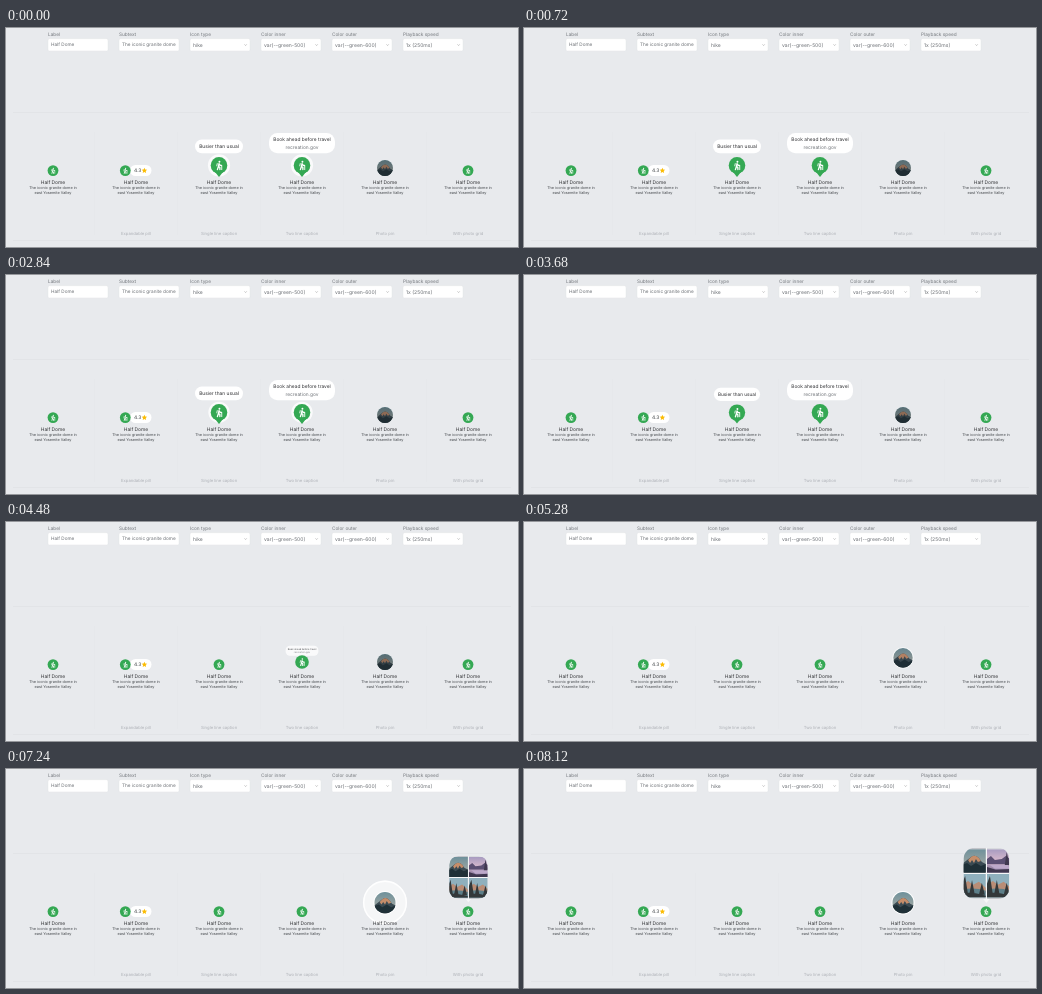
An HTML page that plays this animation: 512 px wide and 219 px high, repeating every 8.28 s.

```html
<!DOCTYPE html>
<html lang="en">
<head>
<meta charset="utf-8">
<title>Map pin states</title>
<style>
html, body { margin: 0; width: 100%; height: 100%; overflow: hidden; background: #e8eaed; }
svg { display: block; width: 100%; height: 100%; font-family: Inter, Roboto, sans-serif; text-rendering: geometricPrecision; }
</style>
</head>
<body>
<svg id="stage" viewBox="0 0 512 219">
  <defs>
    <clipPath id="round"><circle r="12"/></clipPath>
    <clipPath id="tile"><rect x="-12" y="-12" width="24" height="24"/></clipPath>
    <clipPath id="card"><rect id="cardShape" x="-23" y="-52" width="46" height="52"/></clipPath>
    <linearGradient id="haze" x2="0" y2="1">
      <stop stop-color="#6f919b"/><stop offset="1" stop-color="#b3b0a6"/>
    </linearGradient>
    <linearGradient id="dusk" x2="0" y2="1">
      <stop stop-color="#a79bc0"/><stop offset=".45" stop-color="#d3b6cb"/><stop offset="1" stop-color="#75698f"/>
    </linearGradient>
    <g id="dome">
      <path fill="url(#haze)" d="M-12-12h24v24h-24z"/>
      <path fill="#3b4b53" d="M-12 3L-7-1-3-4Q1-7 5-3L8 1 12 3V12H-12z"/>
      <path fill="#c58d6a" d="M-6-1L-3-4Q1-7 5-3L7 0 4 1 2-2 0 2-2-1-4 2z"/>
      <path fill="#1f3037" d="M-12 4L-7 2-3 5 2 2 7 5 12 3V12H-12z"/>
    </g>
    <g id="lake">
      <path fill="url(#dusk)" d="M-12-12h24v24h-24z"/>
      <path fill="#5b4f72" d="M-12-2L-8-5-4-1 3-2 7-5 12-2V3H-12z"/>
      <path fill="#bda9ca" d="M-9 4H9L12 8H-4z"/>
      <path fill="#40384f" d="M-12 6L-3 9 12 8V12H-12zM8-9L11 4H6z"/>
    </g>
    <g id="forest">
      <path fill="#8fb0bd" d="M-12-12h24v24h-24z"/>
      <path fill="#b98d76" d="M-12-1L-6-5-1-1 5-4 12 2V7H-12z"/>
      <path fill="#5d7f89" d="M-12 4Q0 1 12 5V12H-12z"/>
      <path fill="#33383a" d="M-9-10L-6 9H-12V-2zM-2-6L1 10H-5zM8-3L11 9H5zM-12 7Q-2 6 12 10V12H-12z"/>
    </g>
    <g id="hiker" fill="none" stroke="#fff" stroke-width="1.5" stroke-linecap="round" stroke-linejoin="round" transform="scale(.88)">
      <circle cx=".5" cy="-4.1" r="1.1" fill="#fff" stroke="none"/>
      <path d="M0-1.9L-.6 1.1 1 2.4V4.8M-.7 1.2L-1.8 4.8M.2-1.7L1.4-.1 2.7.1"/>
      <path d="M-2-2L-2.5.5M3.1.2V4.8" stroke-width="1"/>
    </g>
  </defs>
</svg>
<script>
const LOOP = 8280, stage = document.getElementById('stage');
const SMALL = .65; // scale of a collapsed pin
const col = i => 47 + 83 * i;
const mix = (a, b, p) => a + (b - a) * p;
const ramp = (t, start, dur) => Math.min(1, Math.max(0, (t - start) / dur));
const smooth = p => p * p * (3 - 2 * p);
const easeOut = p => 1 - (1 - p) ** 3;
const $ = id => document.getElementById(id);
const set = (id, attrs) => Object.entries(attrs).forEach(([k, v]) => $(id).setAttribute(k, v));

const text = (x, y, size, fill, str, anchor = 'start') =>
  `<text x="${x}" y="${y}" font-size="${size}" fill="${fill}" text-anchor="${anchor}">${str}</text>`;
const rect = (x, y, w, h, r, extra = '') =>
  `<rect x="${x}" y="${y}" width="${w}" height="${h}" rx="${r}" fill="#fff" ${extra}/>`;

function field([label, value], i) {
  const x = 42 + 71 * i, isSelect = i > 1;
  return text(x, 8, 4.75, '#74787d', label) +
    rect(x, 10.7, 60, 12.2, 1.5, 'stroke="#e0e2e6" stroke-width=".4"') +
    text(x + 3, isSelect ? 18.7 : 18.3, isSelect ? 5.05 : 4.7, '#6b6f74', value) +
    (isSelect ? `<path d="M${x + 54.5} 16.4l1.1 1.1 1.1-1.1" fill="none" stroke="#888" stroke-width=".5"/>` : '');
}

function column(name, i) {
  const x = col(i), mid = 'middle';
  return text(x, 156, 4.9, '#303134', 'Half Dome', mid) +
    text(x, 161.3, 3.8, '#44484c', 'The iconic granite dome in', mid) +
    text(x, 166.2, 3.8, '#44484c', 'east Yosemite Valley', mid) +
    text(x, 206.8, 4.2, '#adb0b6', name, mid);
}

const pin = (id, x) => `<g id="${id}" transform="translate(${x} 142.6) scale(${SMALL})">
  <path id="${id}Tail" d="M-4 6.5L0 11.5 4 6.5z" fill="#34a853" transform="scale(0)"/>
  <circle r="8.3" fill="#34a853"/><use href="#hiker"/></g>`;

const halo = (id, x, y) => `<circle id="${id}" cx="${x}" cy="${y}" fill="#fff"/>`;
const tile = (name, x, y) => `<g transform="translate(${x} ${y})" clip-path="url(#tile)"><use href="#${name}"/></g>`;

const fields = [['Label', 'Half Dome'], ['Subtext', 'The iconic granite dome'], ['Icon type', 'hike'],
  ['Color inner', 'var(--green-500)'], ['Color outer', 'var(--green-600)'], ['Playback speed', '1x (250ms)']];
const names = ['', 'Expandable pill', 'Single line caption', 'Two line caption', 'Photo pin', 'With photo grid'];
const dividers = names.slice(1).map((_, i) => `M${col(i) + 41.5} 104V207`).join('');

stage.insertAdjacentHTML('beforeend', `
  <path d="M7 84.5H505M7 212.5H505" stroke="#dfe1e5" stroke-width=".6"/>
  <path d="${dividers}" stroke="#e4e6e9" stroke-width=".6"/>
  ${fields.map(field).join('')}
  ${halo('halo2', col(2), 137.3)}${halo('halo3', col(3), 137.3)}${halo('halo4', col(4), 133.5)}
  <circle id="haloEdge" cx="${col(4)}" cy="133.5" fill="none" stroke="#fff" stroke-width="1.4"/>
  ${names.map(column).join('')}
  ${pin('pin0', col(0))}
  ${rect(124, 137, 21.5, 11, 5.5)}
  ${text(128, 144.4, 4.9, '#3c4043', '4.3')}
  <path d="M138.4 139.8l.8 1.8 2 .2-1.5 1.3.4 2-1.7-1-1.7 1 .4-2-1.5-1.3 2-.2z" fill="#fbbc04"/>
  ${pin('pin1', 119.3)}
  <g id="note2">${rect(189, 111.5, 48, 13.8, 6.9)}
    ${text(col(2), 120.2, 4.9, '#303134', 'Busier than usual', 'middle')}</g>
  <g id="note3">${rect(263, 105, 66, 20.3, 8.5)}
    ${text(col(3), 113.2, 4.85, '#303134', 'Book ahead before travel', 'middle')}
    ${text(col(3), 120.6, 4.85, '#6f7378', 'recreation.gov', 'middle')}</g>
  ${pin('pin2', col(2))}${pin('pin3', col(3))}
  <g id="photo"><circle id="ring" r="13.1" fill="#fff"/>
    <g clip-path="url(#round)"><use href="#dome"/><circle id="shade" r="12" fill="#23282d"/></g></g>
  ${pin('pin5', col(5))}
  <g id="grid"><path d="M-4-1H4L0 4z" fill="#f6f7f8"/><g clip-path="url(#card)">
    <path d="M-23-52h46v52h-46z" fill="#f6f7f8"/>
    <path d="M-23-52H-.6V-26.6H-23zM.6-25.4H23V0H.6z" fill="#c3c5ca"/>
    <path d="M.6-52H23V-26.6H.6zM-23-25.4H-.6V0H-23z" fill="#d9dbdf"/>
    <g id="tiles">${tile('dome', -12.6, -38.6)}${tile('lake', 12.6, -38.6)}
      ${tile('forest', -12.6, -13.4)}${tile('forest', 12.6, -13.4)}</g>
  </g></g>`);

// open: 1 = caption and large pin, 0 = small pin
function captionPin(i, open, t) {
  const x = col(i);
  set('pin' + i, { transform: `translate(${x} ${mix(142.6, 137.4, open)}) scale(${mix(SMALL, 1, open)})` });
  set(`pin${i}Tail`, { transform: `scale(${open})` });
  set('note' + i, {
    transform: `translate(${x} 142) scale(${open}) translate(${-x} -142)`,
    opacity: Math.min(1, open * 1.6)
  });
  const start = [2740, 1240, -120].find(s => t >= s);
  const p = ramp(t, start, 800);
  set('halo' + i, { r: mix(8, 16, easeOut(p)), opacity: open < 1 ? 0 : .9 * (1 - p) });
}

function photoPin(t) {
  const p = smooth(ramp(t, 5140, 230));
  set('photo', { transform: `translate(${col(4)} ${mix(140, 133.8, p)}) scale(${mix(8, 10.7, p) / 12})` });
  set('ring', { opacity: p });
  set('shade', { opacity: .35 * (1 - p) });
  const age = t - (t < 7000 ? 5540 : 7030);
  const r = mix(11, 22, easeOut(ramp(age, 0, 220)));
  const alpha = age > 0 ? 1 - ramp(age, 210, 110) : 0;
  set('halo4', { r, opacity: .6 * alpha });
  set('haloEdge', { r: r - .7, opacity: alpha });
}

function photoGrid(t) {
  const open = t < 7000 ? smooth(ramp(t, 6240, 200))
    : t < 7600 ? 1 - smooth(ramp(t, 7190, 185))
    : smooth(ramp(t, 7890, 210));
  set('grid', {
    transform: `translate(462.4 130) scale(${mix(.14, .985, open)})`,
    visibility: open > 0 ? 'visible' : 'hidden'
  });
  set('cardShape', { rx: mix(23, 11, Math.min(1, open * 1.5)) });
  set('tiles', { opacity: ramp(open, .12, .4) });
}

function draw() {
  const t = performance.now() % LOOP;
  captionPin(2, 1 - smooth(ramp(t, 3650, 260)), t);
  captionPin(3, 1 - smooth(ramp(t, 4300, 360)), t);
  photoPin(t);
  photoGrid(t);
  requestAnimationFrame(draw);
}
draw();
</script>
</body>
</html>
```
